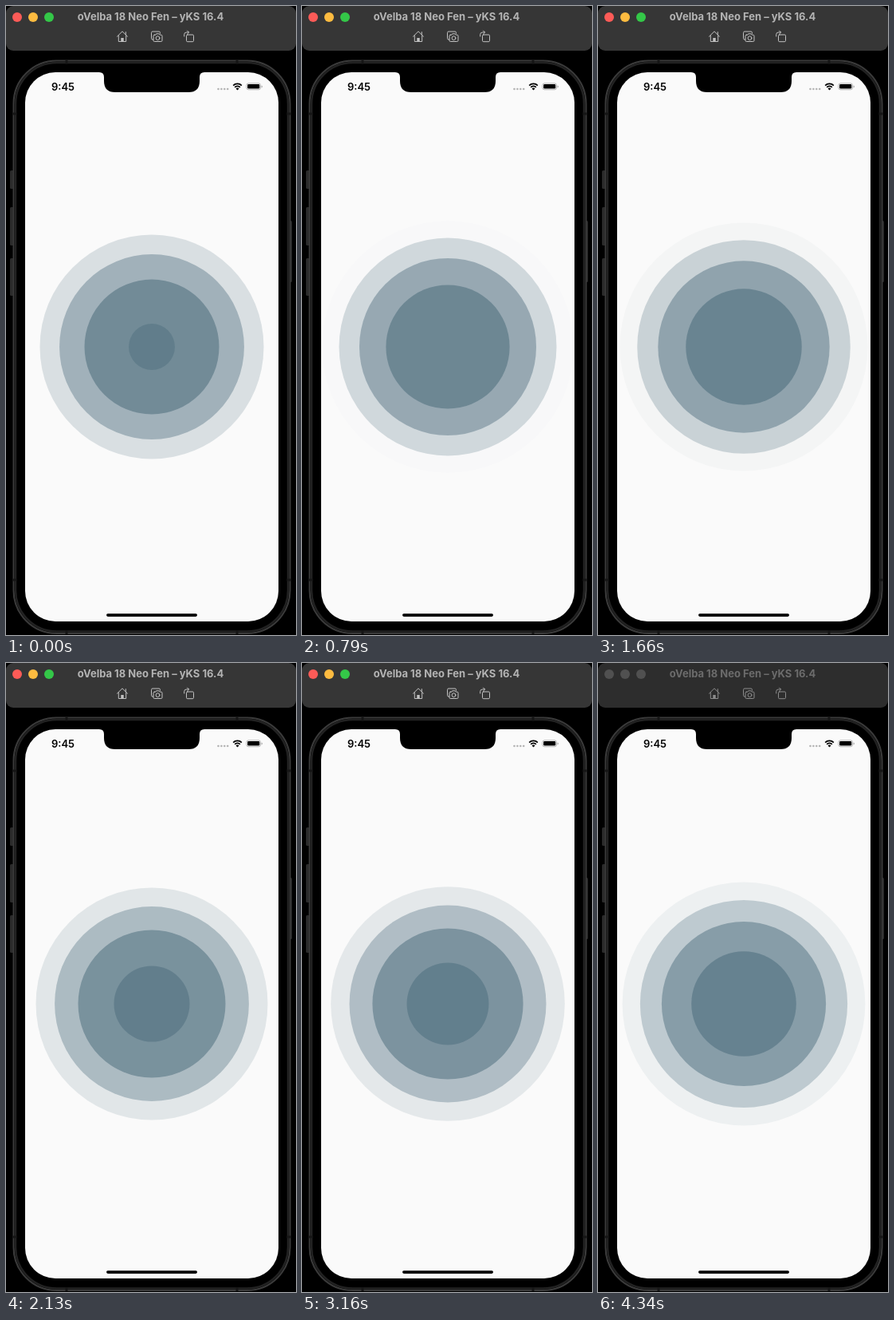
These frames come from a looping animation (364x788 px, 4420 ms). An HTML page:

```html
<!DOCTYPE html>
<html lang="en">
<head>
<meta charset="utf-8">
<title>Ripple</title>
<style>
  html, body { margin: 0; width: 100%; height: 100%; overflow: hidden; background: #000; }
  svg { display: block; width: 364px; height: 788px; }
  text { font-family: Inter, "Liberation Sans", sans-serif; }
  .bar { fill: #363636; }
  .title { fill: #b4b4b4; font-size: 13px; font-weight: 700; text-anchor: middle; }
  .tools { fill: none; stroke: #c2c2c2; stroke-width: 1; stroke-linejoin: round; stroke-linecap: round; }
  .tools .solid { fill: #c2c2c2; stroke: none; }
  .idle .bar { fill: #2d2d2d; }
  .idle .title { fill: #6c6c6c; }
  .idle .tools { stroke: #8c8c8c; }
  .idle .tools .solid { fill: #8c8c8c; }
  .idle .lights circle { fill: #505050; }
  .clock { font-size: 13px; font-weight: 600; }
</style>
</head>
<body>
<svg viewBox="0 0 364 788">
  <rect width="364" height="788"/>

  <g id="window">
    <rect class="bar" width="364" height="56" rx="9"/>
    <g class="lights">
      <circle cx="14" cy="14" r="6" fill="#fc5b57"/>
      <circle cx="34" cy="14" r="6" fill="#fdbb40"/>
      <circle cx="54" cy="14" r="6" fill="#34c748"/>
    </g>
    <text class="title" x="181.5" y="18">oVelba 18 Neo Fen – yKS 16.4</text>
    <g class="tools">
      <path d="M139.5 38.2 146 31.8l6.5 6.4M141.3 37v7.5h9.4V37M150.3 35.6v-3"/>
      <path class="solid" d="M144.3 45v-5h3.4v5z"/>
      <path d="M184.7 42h-.7q-1.5 0-1.5-1.5v-7q0-1.5 1.5-1.5h8q1.5 0 1.5 1.5v.8"/>
      <path d="M186.3 36.2h1.5l.9-1.4h3.6l.9 1.4h1.5q1.3 0 1.3 1.3v5.7q0 1.3-1.3 1.3h-8.4q-1.3 0-1.3-1.3v-5.7q0-1.3 1.3-1.3z"/>
      <circle cx="190.5" cy="40.2" r="2.4"/>
      <rect x="226.5" y="36" width="9" height="8.7" rx="1.3"/>
      <path d="M223.7 38v-2.2q0-2.8 2.8-2.8h3M227.6 31l2 2-2 2"/>
    </g>
  </g>

  <g id="phone">
    <g fill="#2b2b2b">
      <rect x="5" y="206" width="6" height="23" rx="1.5"/>
      <rect x="5" y="252" width="6" height="48" rx="1.5"/>
      <rect x="5" y="316" width="6" height="47" rx="1.5"/>
      <rect x="354" y="269" width="5" height="77" rx="1.5"/>
    </g>
    <rect x="9.5" y="68.5" width="347" height="717.5" rx="54" fill="#000" stroke="#3b3b3b" stroke-width="2"/>
    <rect x="12" y="71" width="342" height="712.5" rx="51.5" fill="none" stroke="#222" stroke-width="2.5"/>
    <path d="M8.5 135h5M352.5 135h5M8.5 719h5M352.5 719h5M76 67.5v5M290 67.5v5M76 782v5M290 782v5" stroke="#161616" stroke-width="3"/>
    <rect x="24" y="83" width="318" height="688" rx="38" fill="#fafafa"/>
    <path d="M117 82.5V83q6 0 6 6v5q0 14 14 14h92q14 0 14-14v-5q0-6 6-6v-.5z"/>
  </g>

  <g id="status">
    <text class="clock" x="57" y="105.5">9:45</text>
    <g fill="#b4b4b4">
      <circle cx="266.5" cy="104" r="1.3"/><circle cx="270.4" cy="104" r="1.3"/>
      <circle cx="274.3" cy="104" r="1.3"/><circle cx="278.2" cy="104" r="1.3"/>
    </g>
    <path d="M285.2 99.6a7.5 7.5 0 0 1 10.6 0M287.2 101.8a4.6 4.6 0 0 1 6.6 0" fill="none" stroke="#000" stroke-width="1.8"/>
    <path d="M290.5 105.6l-2-2.1a2.9 2.9 0 0 1 4 0z"/>
    <rect x="301.9" y="96.9" width="17.6" height="7.9" rx="2.4" fill="none" stroke="#a4a4a4" stroke-width=".8"/>
    <rect x="303.1" y="98.1" width="15.2" height="5.5" rx="1.4"/>
    <path d="M320.6 99.4q1.3.4 1.3 1.5t-1.3 1.5z" fill="#a4a4a4"/>
  </g>

  <g id="waves" fill="#607d8b"></g>
  <rect x="126" y="761.3" width="114" height="3.6" rx="1.8"/>
</svg>

<script>
const LOOP = 4420;
const WAVES = 4;
const MAX_RADIUS = 158.75;
const BLUR_AT = 3230; // window loses focus

// Steps last 80 ms, except a few of 70 ms.
const shortSteps = new Set([9, 18, 24, 32, 40, 52]);
const starts = [0];
for (let k = 0; k < 55; k++) starts.push(starts[k] + (shortSteps.has(k) ? 70 : 80));

// [step, wave phase], linear in between
const phases = [[0, .133], [10, .956], [21, 1.84], [27, 2.358], [40, 3.42], [49, 4.174], [55, 4.687]];

function phaseAt(step) {
  const i = Math.max(1, phases.findIndex(p => p[0] >= step));
  const [a, from] = phases[i - 1];
  const [b, to] = phases[i];
  return (from + (to - from) * (step - a) / (b - a)) % 1;
}

const windowBar = document.getElementById("window");
const waves = document.getElementById("waves");
const circles = Array.from({ length: WAVES }, () => {
  const c = document.createElementNS("http://www.w3.org/2000/svg", "circle");
  c.setAttribute("cx", 183);
  c.setAttribute("cy", 427);
  return waves.appendChild(c);
});

function draw(time) {
  const step = starts.findLastIndex(s => s <= time);
  const phase = phaseAt(step);
  // The widest wave comes first; area grows evenly while opacity falls.
  circles.forEach((c, i) => {
    const part = (WAVES - 1 - i + phase) / WAVES;
    c.setAttribute("r", MAX_RADIUS * Math.sqrt(part));
    c.setAttribute("fill-opacity", 1 - part);
  });
  windowBar.classList.toggle("idle", time >= BLUR_AT);
}

const begin = performance.now();
function tick() {
  draw((performance.now() - begin) % LOOP);
  requestAnimationFrame(tick);
}
tick();
</script>
</body>
</html>
```
